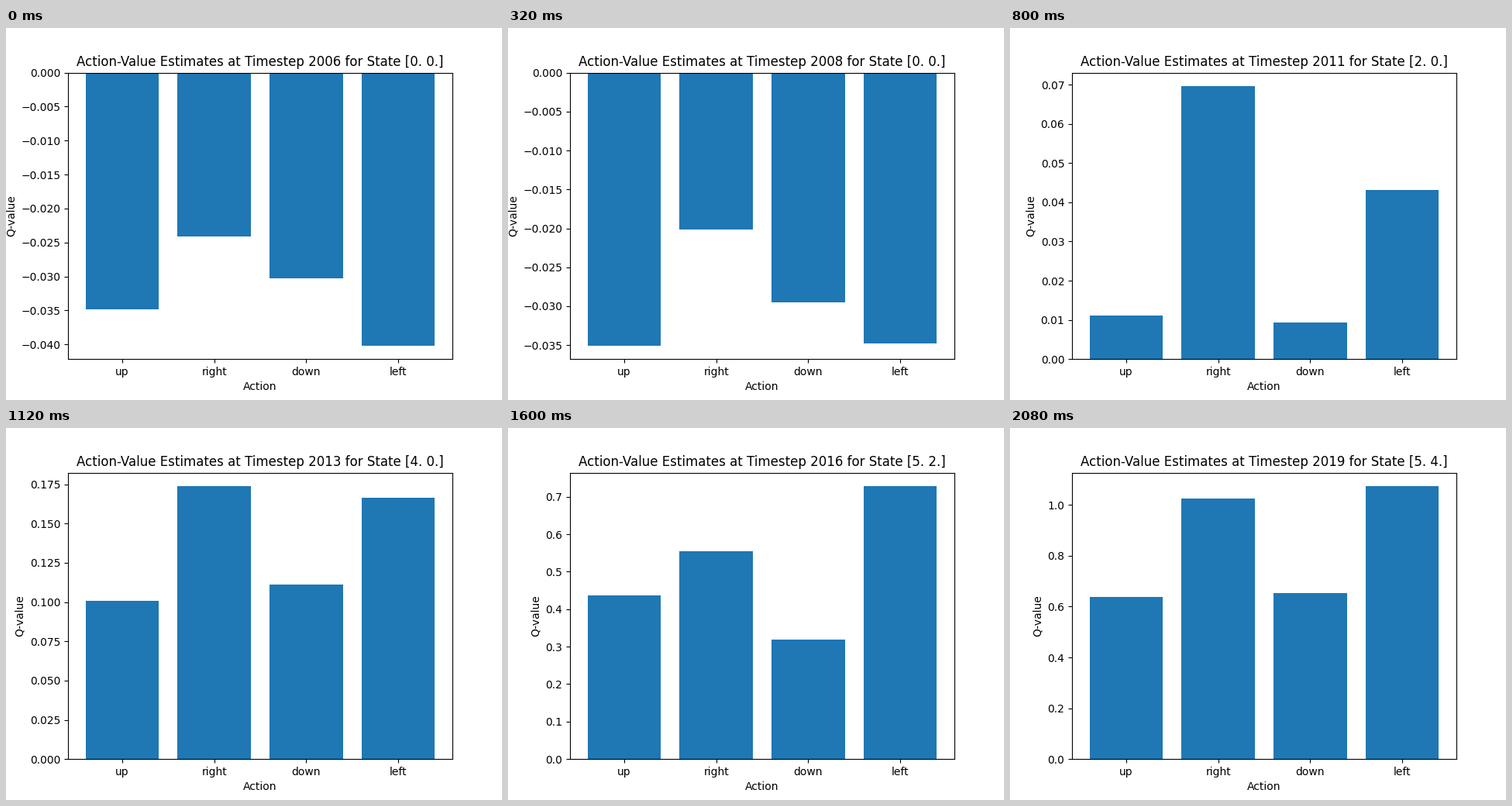
A matplotlib script that plays this animation: 640 px wide and 480 px high, repeating every 2240 ms.

```python
import matplotlib.pyplot as plt
import numpy as np
from matplotlib.animation import FuncAnimation

FIRST_STEP = 2006
INTERVAL = 160

# the walk through the grid: r = right, d = down, . = stays in place
MOVES = "..r.rrrrddd.d"
STAY_DRIFT = 0.1  # learning during a stay, relative to a move

# action values at key steps; the steps between follow the walk
KEYS = [0, 2, 3, 5, 7, 10, 13]
VALUES = {
    "up": [-0.03484, -0.03504, -0.022215, 0.0111, 0.1007, 0.4368, 0.6378],
    "right": [-0.02412, -0.02014, 0.020316, 0.06957, 0.1737, 0.5547, 1.025],
    "down": [-0.03028, -0.0295, -0.00682, 0.0093, 0.1111, 0.3189, 0.653],
    "left": [-0.04016, -0.03477, -0.0034, 0.0431, 0.1664, 0.728, 1.0732],
}

fig, ax = plt.subplots(figsize=(6.4, 4.8), dpi=100)


def progress(i):
    stays = MOVES[:i].count(".")
    return i - stays + STAY_DRIFT * stays


def state(i):
    walked = MOVES[:i]
    return np.array([walked.count("r"), walked.count("d")], dtype=float)


def draw(i):
    marks = [progress(k) for k in KEYS]
    heights = [np.interp(progress(i), marks, v) for v in VALUES.values()]
    ax.clear()
    ax.bar(list(VALUES), heights)
    ax.set_xlabel("Action")
    ax.set_ylabel("Q-value")
    ax.set_title(f"Action-Value Estimates at Timestep {FIRST_STEP + i} "
                 f"for State {state(i)}")
    return ax.patches


anim = FuncAnimation(fig, draw, frames=len(MOVES) + 1, interval=INTERVAL,
                     repeat=True, repeat_delay=0, blit=False)

plt.show()
```
